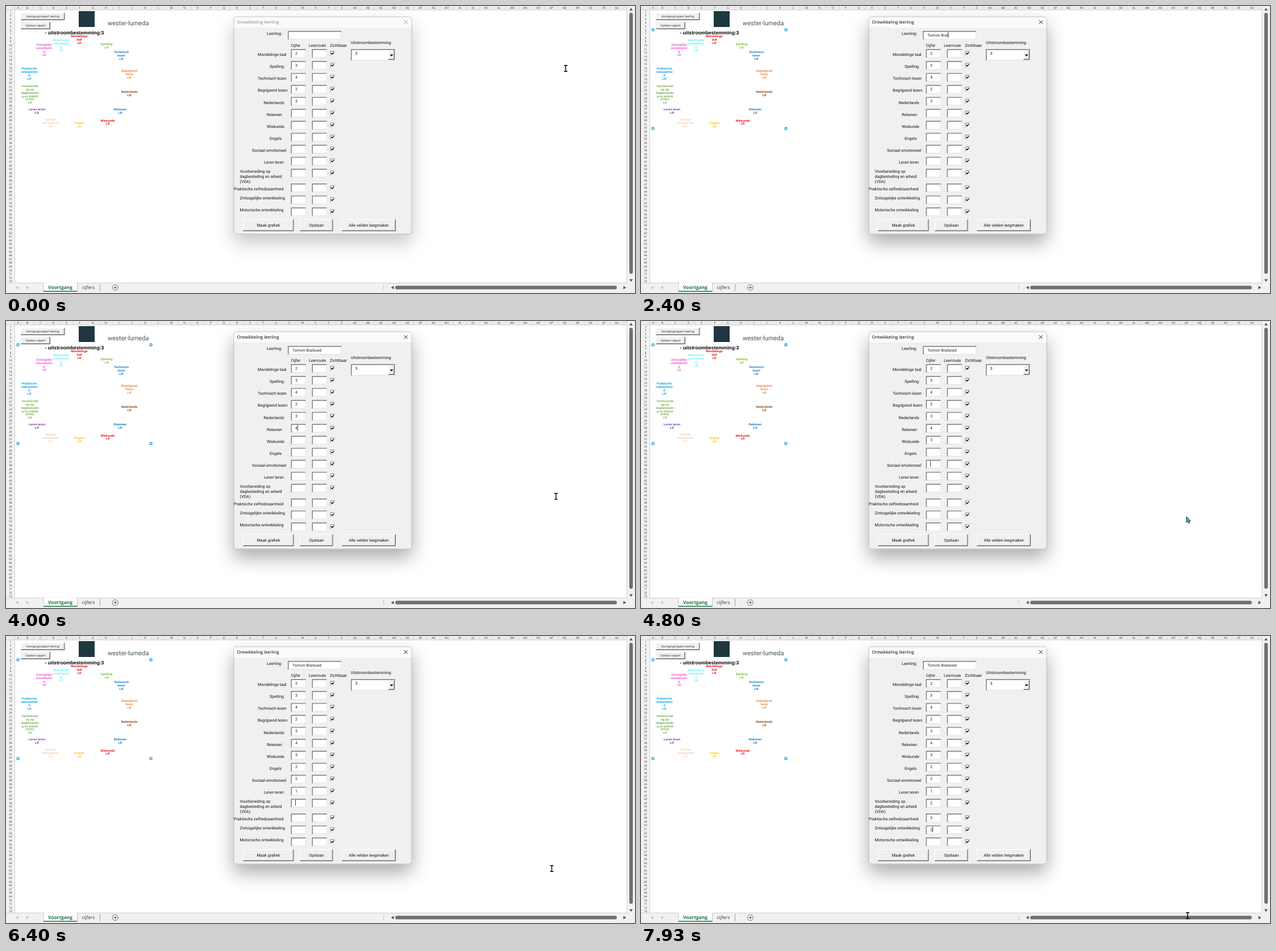
Write an HTML page that moves like this. It is 1107 px wide and 506 px high and loops after 8 s.

```html
<!DOCTYPE html>
<html lang="nl">
<head>
<meta charset="utf-8">
<title>Ontwikkeling leerling</title>
<style>
  html, body { margin: 0; width: 100%; height: 100%; overflow: hidden; background: #fff; }
  svg { display: block; }
  text { white-space: pre; text-rendering: geometricPrecision; font-family: Roboto, sans-serif; }
  .sheet { font-family: "Liberation Sans", Arial, sans-serif; }
  .system { font-family: "Open Sans", sans-serif; }
  .bold { font-weight: 700; }
  .mid { text-anchor: middle; }
</style>
</head>
<body>
<svg id="stage" width="1107" height="506" viewBox="0 0 1107 506"></svg>
<script>
const LOOP = 8000, BLINK = 535, ACTIVE_AT = 70, SELECTED_AT = 130;
const stage = document.getElementById('stage');
const FORM_SIZE = 7.1;

const rect = (x, y, w, h, fill, more = '') =>
  `<rect x="${x}" y="${y}" width="${w}" height="${h}" fill="${fill}" ${more}/>`;
const path = (d, stroke, width = 1, fill = 'none') =>
  `<path d="${d}" stroke="${stroke}" stroke-width="${width}" fill="${fill}"/>`;
// y is the middle of the lower-case letters
const text = (x, y, str, size = FORM_SIZE, cls = '', fill = '#111', more = '') =>
  `<text x="${x}" y="${y + size * 0.34}" font-size="${size}" class="${cls}" fill="${fill}" ${more}>${str}</text>`;

function raised(x, y, w, h, label, size, cls = '') {
  return rect(x, y, w, h, '#f0f0f0') +
    path(`M${x + .5} ${y + h}V${y + .5}H${x + w}`, '#fff') +
    path(`M${x + 1} ${y + h - 1.3}H${x + w - 1.3}V${y + 1}`, '#a0a0a0') +
    path(`M${x} ${y + h - .5}H${x + w - .5}V${y}`, '#646464') +
    text(x + w / 2, y + h / 2, label, size, 'mid ' + cls);
}

function sunken(x, y, w, h, edge = 1.4) {
  return rect(x, y, w, h, '#fff') +
    path(`M${x} ${y + h - .5}H${x + w - .5}V${y}`, '#e3e3e3') +
    path(`M${x + edge / 2} ${y + h}V${y + edge / 2}H${x + w}`, '#777', edge);
}

function columnName(i) {
  const letter = n => String.fromCharCode(65 + n);
  return i < 26 ? letter(i) : 'A' + letter(i - 26);
}

function sheet() {
  let out = rect(0, 0, 1107, 506, '#fff') + rect(0, 0, 1093, 7, '#ececec') + rect(0, 7, 15.5, 481, '#f4f4f4');
  out += path('M0 7H1093M15.5 0V488', '#b8b8b8', .6);
  for (let i = 0; i < 47; i++) {
    const x = i ? 37.5 + (i - 1) * 23.06 : 21;
    out += text(x, 3.6, columnName(i), 5, 'mid system', '#333');
    out += path(`M${i ? x + 11.5 : 26} 1V6.5`, '#c4c4c4', .5);
  }
  for (let i = 0; i < 73; i++) {
    const y = 10 + i * 6.61;
    out += text(8, y, i + 1, 4.6, 'mid system', '#111') + path(`M0 ${y + 3.4}H15`, '#d4d4d4', .4);
  }
  out += raised(26, 12, 77.5, 13, 'Voortgangsrapport leerling', 4.65, 'system');
  out += raised(26, 28, 52, 13, 'Opslaan rapport', 4.65, 'system');
  out += rect(128, 9, 28, 28, '#1f3740');
  out += text(179, 30.5, 'wester-lumeda', 11, '', '#40535b');
  return out + text(68.5, 47.3, '- uitstroombestemming:3', 8.67, 'sheet bold', '#000');
}

function chartLabels() {
  const labels = [
    [129, 53.5, '#f00000', 'Mondelinge|taal'],
    [177, 67, '#76b82a', 'Spelling'],
    [203, 81, '#0070c0', 'Technisch|lezen'],
    [217, 114, '#ed7d31', 'Begrijpend|lezen'],
    [217, 151.5, '#843c0c', 'Nederlands'],
    [201, 182, '#0070c0', 'Rekenen'],
    [179, 201.7, '#f00000', 'Wiskunde'],
    [129, 206, '#ffc000', 'Engels'],
    [78, 200, '#f8cbad', 'Sociaal|emotioneel'],
    [54.5, 182, '#7030a0', 'Leren leren'],
    [42, 141, '#70ad47', 'Voorbereidi|ng op|dagbestedin|g en arbeid|(VDA)'],
    [41, 110.3, '#009fe0', 'Praktische|redzaamhei|d'],
    [67, 68, '#f04fd8', 'Zintuiglijke|ontwikkelin|g'],
    [97, 60.3, '#66eef5', 'Motorische|ontwikkelin|g'],
  ];
  return labels.map(([x, y, color, lines]) => [...lines.split('|'), 'LR']
    .map((line, i) => text(x, y + i * 5.9, line, 5.35, 'sheet bold mid', color)).join('')).join('');
}

function bottomBar() {
  const triangle = (x, y, dx, dy, fill) => path(dx
    ? `M${x - dx} ${y - 3}V${y + 3}L${x + dx} ${y}Z` : `M${x - 3} ${y - dy}H${x + 3}L${x} ${y + dy}Z`, 'none', 0, fill);
  return rect(1093, 0, 14, 506, '#f1f1f1') + rect(0, 488, 1107, 18, '#f1f1f1') +
    path('M0 488.3H1093M1092.7 0V488', '#c6c6c6', .8) +
    rect(66, 488, 59.5, 16, '#fff') + path('M66 488V503M125.5 488V503', '#b5b5b5', .8) +
    rect(66, 502.2, 59.5, 1.6, '#217346') +
    text(95.5, 496.5, 'Voortgang', 8.4, 'mid bold system', '#217346') +
    text(145, 496.5, 'cijfers', 8.2, 'mid system', '#333') +
    path('M165.5 490V503', '#888', .8) +
    '<circle cx="192.3" cy="496.5" r="5" fill="#fff" stroke="#555" stroke-width=".9"/>' +
    path('M189.5 496.5H195M192.3 493.7V499.3', '#444', 1) +
    triangle(19.5, 496.5, -1.8, 0, '#bbb') + triangle(38, 496.5, 1.8, 0, '#bbb') +
    [493.5, 496.5, 499.5].map(y => rect(664, y - .5, 1.1, 1.1, '#888')).join('') +
    triangle(680, 496.5, -2.5, 0, '#555') + triangle(1089, 496.5, 2.5, 0, '#555') +
    triangle(1100, 5.5, 0, -2.3, '#555') + triangle(1100, 484, 0, 2.3, '#555') +
    rect(685, 493.3, 390, 6.2, '#707070', 'rx="3.1"') + rect(1097, 12, 6.2, 460, '#707070', 'rx="3.1"');
}

// Label x, label y and text of every form row
const rows = [
  [443, 86, 'Mondelinge taal'], [464, 107, 'Spelling'], [443, 128, 'Technisch lezen'],
  [443, 149, 'Begrijpend lezen'], [453.5, 170.5, 'Nederlands'], [459, 191.5, 'Rekenen'],
  [459, 212.5, 'Wiskunde'], [464, 233.5, 'Engels'], [433, 254.5, 'Sociaal emotioneel'],
  [454, 275.5, 'Leren leren'], [411.5, 292, 'Voorbereiding op|dagbesteding en arbeid|(VDA)'],
  [401, 322.5, 'Praktische zelfredzaamheid'], [411.5, 338.5, 'Zintuigelijke ontwikkeling'],
  [411.5, 359.5, 'Motorische ontwikkeling'],
];
const rowY = i => 83.3 + i * 21.1 + (i > 10 ? 5 : 0);

function dialog() {
  let out = rect(401, 19, 313, 383, '#f0f0f0', 'id="frame" rx="5" stroke="#b4b4b4" stroke-width="1"');
  out += path('M401.5 38V24Q401.5 19.5 406 19.5H709Q713.5 19.5 713.5 24V38Z', 'none', 0, '#fafafa');
  out += `<g id="title">${text(406.5, 28.8, 'Ontwikkeling leerling', 7.58, 'system', 'currentColor')}` +
    path('M700.5 25.2L706.8 31.5M706.8 25.2L700.5 31.5', 'currentColor', .9) + '</g>';
  out += text(459, 49, 'Leerling:') + sunken(496, 44, 94, 15);
  out += text(501.5, 70, 'Cijfer') + text(533, 70, 'Leerroute') + text(570, 70, 'Zichtbaar');
  out += text(607, 65, 'Uitstroombestemming') + sunken(607, 76, 78, 20);
  out += text(614.5, 83.3, '3') + raised(673, 78, 11, 17, '', 5);
  out += path('M675.5 85.5H681.5L678.5 88.7Z', 'none', 0, '#000');
  rows.forEach(([x, y, label], i) => {
    const mid = rowY(i);
    label.split('|').forEach((line, n) => out += text(x, y + n * 8.8, line));
    out += sunken(501.5, mid - 7.3, 26, 15) + sunken(538.5, mid - 7.3, 26, 15);
    out += sunken(570.5, mid - 4, 8, 8, 1) + path(`M572.5 ${mid - .3}l1.6 1.8l3 -3.1`, '#000', 1.5);
    out += text(509, mid, '', 7, '', '#222', `id="grade${i}"`);
  });
  return out + raised(417, 376, 89.5, 21, 'Maak grafiek') + raised(517, 376, 58.5, 21, 'Opslaan') +
    raised(591, 376, 95, 21, 'Alle velden leegmaken') +
    text(504, 51.3, '', 6.9, '', '#222', 'id="name"') + '<path id="caret" stroke="#222" stroke-width=".9"/>';
}

const handles = [[21, 42], [255, 42], [21, 216], [255, 216]].map(([x, y]) =>
  `<circle cx="${x}" cy="${y}" r="2" fill="#fff" stroke="#1e9bd7" stroke-width="1.3"/>`).join('');

const shadow = (id, opacity) => `<filter id="${id}" x="-30%" y="-20%" width="160%" height="150%">
  <feDropShadow dx="0" dy="15" stdDeviation="16" flood-opacity="${opacity}"/></filter>`;

stage.innerHTML = shadow('strong', .33) + shadow('weak', .22) + sheet() + chartLabels() +
  `<g id="handles">${handles}</g>` + bottomBar() + dialog() +
  `<g id="pointer"><g id="beam">${path('M0 -5V5M-3 -5.2H3M-3 5.2H3', '#000', 1.4)}</g>
  <g id="arrow">${path('M-2 -6V4.3L.4 2.2L2 5.6L3.6 4.9L2.2 1.7H5.2Z', '#111', .9, '#38bfe0')}</g></g>`;

const find = id => document.getElementById(id);
const nameField = find('name'), caret = find('caret');
const gradeFields = rows.map((_, i) => find('grade' + i));

const NAME = 'Tomvin Bralsoed';
const keyTimes = [1400, 1470, 1530, 1670, 1730, 1800, 1870, 2070, 2200, 2270, 2400, 2530, 2600, 2670, 2800];
// Time, form row (-1 is the name) and the content from then on
const edits = [
  [130, -1, ''], ...keyTimes.map((t, i) => [t, -1, NAME.slice(0, i + 1)]),
  [3600, 5, ''], [3930, 5, '4'], [4200, 6, ''], [4400, 6, '3'], [4730, 8, ''],
  [5070, 7, ''], [5200, 7, '2'], [5400, 8, ''], [5600, 8, '2'], [5930, 9, ''],
  [6130, 9, '1'], [6400, 10, ''], [6600, 10, '2'], [6930, 11, ''], [7130, 11, '3'],
  [7730, 12, ''], [7930, 12, '2'],
];
// Time, x, y
const pointerPath = [
  [0, 985, 110], [3200, 985, 110], [3400, 1022, 170], [3670, 969, 285], [3800, 969, 285],
  [4000, 968, 309], [4130, 968, 329], [4400, 968, 330], [4670, 963, 354], [4800, 962, 351],
  [5000, 963, 335], [5200, 963, 335], [5470, 962, 361], [5600, 962, 361], [5930, 961, 396],
  [6130, 961, 396], [6400, 960.5, 410], [6600, 960.5, 410], [6870, 961, 448], [7130, 961, 448],
  [7330, 960, 492], [7400, 960, 492], [7530, 960, 472], [7600, 960, 472], [7930, 962, 493], [8000, 962, 493],
];
// The pointer vanishes while the name is typed
const hiddenSpans = [[1400, 1530], [1670, 3270]];

function pointerAt(t) {
  const next = pointerPath.findIndex(p => p[0] > t);
  const [t0, x0, y0] = pointerPath[next - 1], [t1, x1, y1] = pointerPath[next];
  const k = (t - t0) / (t1 - t0);
  return [x0 + (x1 - x0) * k, y0 + (y1 - y0) * k];
}

const show = (node, visible) => node.setAttribute('visibility', visible ? 'visible' : 'hidden');

function draw(t) {
  const active = t >= ACTIVE_AT;
  find('frame').setAttribute('filter', `url(#${active ? 'strong' : 'weak'})`);
  find('title').style.color = active ? '#000' : '#888';
  show(find('handles'), t >= SELECTED_AT);

  const grades = ['2', '3', '4', '2', '3'];
  let name = '', last = null;
  for (const edit of edits) {
    if (edit[0] > t) break;
    last = edit;
    if (edit[1] < 0) name = edit[2];
    else grades[edit[1]] = edit[2];
  }
  nameField.textContent = name;
  gradeFields.forEach((field, i) => field.textContent = grades[i] || '');

  show(caret, last && Math.floor((t - last[0]) / BLINK) % 2 === 0);
  if (last) {
    const inName = last[1] < 0;
    const field = inName ? nameField : gradeFields[last[1]];
    const x = (inName ? 504 : 509) + (last[2] ? field.getComputedTextLength() : 0) + .5;
    const y = inName ? 51 : rowY(last[1]) - .3;
    caret.setAttribute('d', `M${x} ${y - 5}V${y + 5}`);
  }

  const [x, y] = pointerAt(t);
  const hidden = hiddenSpans.some(([from, to]) => t >= from && t < to);
  const isArrow = t >= 4670 && t < 4930;
  find('pointer').setAttribute('transform', `translate(${x} ${y})`);
  show(find('beam'), !hidden && !isArrow);
  show(find('arrow'), isArrow);
}

const start = performance.now();
function tick() {
  draw((performance.now() - start) % LOOP);
  requestAnimationFrame(tick);
}
tick();
</script>
</body>
</html>
```
